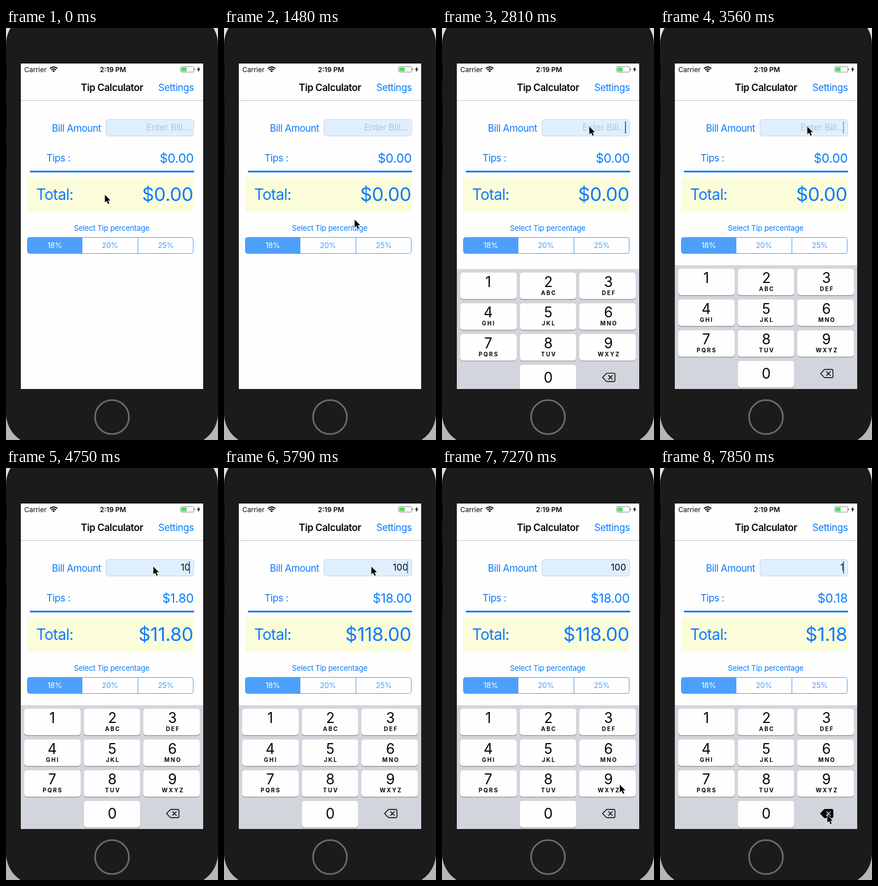
An HTML page for the animation above (8 s loop, 372x719 px).

```html
<!DOCTYPE html>
<html lang="en">
<head>
<meta charset="utf-8">
<title>Tip Calculator</title>
<style>
  html, body { margin: 0; width: 100%; height: 100%; overflow: hidden; }
  body { background: linear-gradient(#dcdcde, #b8b5b8); }
  svg { display: block; width: 372px; height: 719px; }
  text {
    font-family: Inter, Roboto, sans-serif; font-size: 17px; letter-spacing: -.023em;
    font-optical-sizing: none; fill: #087bff; white-space: pre;
  }
  .mid { text-anchor: middle; }
  .end { text-anchor: end; }
  .bold { font-weight: 600; }
  .ink { fill: #080808; }
  .status { font-size: 12px; letter-spacing: 0; }
  .small { font-size: 13px; letter-spacing: -.01em; }
  .input { font-size: 16px; letter-spacing: -.015em; fill: #b7c4d2; }
  .input.typed { letter-spacing: 0; fill: #080808; }
  .tip { font-size: 22px; letter-spacing: -.01em; }
  .total { font-size: 33px; letter-spacing: -.01em; }
  .heading { font-size: 26.5px; }
  .digit { font-size: 25px; letter-spacing: 0; }
  .letters { font-size: 10px; letter-spacing: 2px; font-weight: 700; }
  .pale { fill: #4ca0fb; }
  .white { fill: #fff; }
</style>
</head>
<body>
<svg viewBox="0 0 372 719">
  <defs>
    <clipPath id="screen"><rect x="26" y="62" width="320" height="568"/></clipPath>
  </defs>

  <!-- phone -->
  <rect y="-27" width="372" height="755" rx="56" fill="#1b1b1b"/>
  <path d="M.5 62v30M.5 124v58M.5 194v58" stroke="#050505"/>
  <circle cx="186" cy="679" r="29.7" fill="none" stroke="#6c6c6c" stroke-width="2.8"/>
  <rect x="26" y="62" width="320" height="568" fill="#fefefe"/>

  <!-- status bar -->
  <text class="status ink" x="32" y="76.5">Carrier</text>
  <g fill="none" stroke="#080808" stroke-width="2">
    <path d="M77.2 70.7a9 9 0 0 1 12.8 0M79.5 73.2a5.8 5.8 0 0 1 8.2 0"/>
    <path d="M83.6 77.2l-2.2-2.3a3 3 0 0 1 4.4 0z" fill="#080808" stroke="none"/>
  </g>
  <text class="status ink bold mid" x="187.7" y="76.5">2:19 PM</text>
  <rect x="306.5" y="67.5" width="23" height="9.5" rx="2" fill="none" stroke="#8b8b8b"/>
  <rect x="308" y="69" width="9" height="6.5" fill="#57d664"/>
  <path d="M331 70.5v3.5" stroke="#8b8b8b" stroke-width="1.4"/>
  <path d="M339.2 67.5l-4.2 5.3h2.6l-1 4.2 4.4-5.4h-2.6z" fill="#080808"/>

  <!-- navigation bar -->
  <text class="ink bold mid" x="186" y="110">Tip Calculator</text>
  <text class="end" x="329.5" y="110">Settings</text>
  <path d="M26 126.5h320" stroke="#c8c8c8"/>

  <!-- form -->
  <text class="end" x="167" y="181">Bill Amount</text>
  <rect x="175.5" y="159.5" width="154" height="29" rx="4.5" fill="#dfeffe" stroke="#c6d8e8"/>
  <text class="input end" x="323" y="179" id="bill"></text>
  <rect x="321" y="163" width="2" height="21" fill="#3f6ce8" id="caret"/>
  <text x="71" y="233">Tips :</text>
  <text class="tip end" x="329.5" y="235" id="tip"></text>
  <rect x="42" y="249" width="288" height="3" fill="#087bff"/>
  <rect x="37" y="260" width="292" height="61" fill="#fbfcda"/>
  <text class="heading" x="53" y="300">Total:</text>
  <text class="total end" x="328.5" y="302" id="total"></text>

  <!-- percentage choice -->
  <text class="small mid" x="185.5" y="354">Select Tip percentage</text>
  <path d="M134 365.5H41.5a4 4 0 0 0-4 4v20a4 4 0 0 0 4 4H134z" fill="#4ca0fb"/>
  <rect x="37.5" y="365.5" width="291" height="28" rx="4" fill="none" stroke="#4ca0fb"/>
  <path d="M231.5 365.5v28" stroke="#4ca0fb"/>
  <text class="small mid white" x="85.5" y="384">18%</text>
  <text class="small mid pale" x="182.5" y="384">20%</text>
  <text class="small mid pale" x="280.5" y="384">25%</text>

  <g clip-path="url(#screen)">
    <g id="keyboard">
      <rect x="26" width="320" height="217" fill="#d2d5dc"/>
      <g id="keys"></g>
      <path id="eraser" d="M281.8 189l6.2-6.500q.9-.8 2-.8h11.2q2.300 0 2.300 2.300v10q0 2.300-2.300 2.300H290q-1.100 0-2-.8z"
        stroke="#080808" stroke-width="1.4" stroke-linejoin="round"/>
      <path id="cross" d="M292.300 185.700l6.600 6.600m0-6.600l-6.600 6.600" fill="none" stroke-width="1.5" stroke-linecap="round"/>
    </g>
  </g>

  <path id="pointer" d="M0 0V13.600L3.200 10.700L5.500 16L7.900 15L5.600 9.900H9.900Z"
    fill="#050505" stroke="#fff" stroke-width="1.500" stroke-linejoin="round" paint-order="stroke"/>
</svg>

<script>
const LOOP = 8000;
const TICK = 147.6;
const FOCUS = 2472;            // the bill field gets the focus
const TYPE = 4300, TYPE_GAP = 450;
const ERASE = 7710, ERASE_GAP = 140;

const moves = [
  { start: 600, end: 880, x: 210, y: 441, bow: 0 },
  { start: 1035, end: 2060, x: 258.5, y: 172, bow: 0 },
  { start: 5905, end: 6340, x: 288.5, y: 180.5, bow: 0 },
  { start: 6640, end: 7400, x: 293.5, y: 605.5, bow: 50 }
];

const $ = id => document.getElementById(id);
const clamp = (value, low, high) => Math.min(high, Math.max(low, value));
const ease = p => p * p * (3 - 2 * p);
const countSince = (time, start, gap, max) => clamp(Math.floor((time - start) / gap) + 1, 0, max);

function pointerAt(time) {
  let x = 173.5, y = 291;
  for (const move of moves) {
    const p = ease(clamp((time - move.start) / (move.end - move.start), 0, 1));
    x += (move.x - x) * p + move.bow * Math.sin(Math.PI * p);
    y += (move.y - y) * p;
  }
  return [x, y];
}

// Critically damped spring from the bottom edge of the screen.
function keyboardTop(time) {
  const t = .016 * Math.max(0, time - FOCUS);
  return 414 + 216 * (1 + t) * Math.exp(-t);
}

// The caret stays solid after a key press, then fades in and out.
function caretOpacity(time, lastKey) {
  if (time < FOCUS) return 0;
  const phase = Math.max(0, time - lastKey - 300) / 1050;
  return clamp(.7 + 1.6 * Math.cos(2 * Math.PI * phase), 0, 1);
}

function buildKeys() {
  const letters = ['', 'ABC', 'DEF', 'GHI', 'JKL', 'MNO', 'PQRS', 'TUV', 'WXYZ'];
  const key = (label, sub, col, row) => {
    const x = 32 + col * 104.5, y = 6 + row * 53.7, mid = 81 + col * 105.5;
    const baseline = y + (label === '0' ? 31 : 25);
    return `<rect x="${x}" y="${y + 1}" width="99" height="46.500" rx="5" fill="#8b8e94"/>
      <rect x="${x}" y="${y}" width="99" height="46.300" rx="5" fill="#fefefe"/>
      <text class="digit ink mid" x="${mid}" y="${baseline}">${label}</text>
      <text class="letters ink mid" x="${mid + 1}" y="${y + 39}">${sub}</text>`;
  };
  $('keys').innerHTML = letters
    .map((sub, i) => key(String(i + 1), sub, i % 3, Math.floor(i / 3)))
    .join('') + key('0', '', 1, 3);
}

function draw(time) {
  const held = Math.floor(time / TICK) * TICK;
  const typed = countSince(time, TYPE, TYPE_GAP, 3);
  const erased = countSince(time, ERASE, ERASE_GAP, 2);
  const digits = typed - erased;
  const bill = digits ? 10 ** (digits - 1) : 0;
  const lastKey = erased ? ERASE + (erased - 1) * ERASE_GAP
    : typed ? TYPE + (typed - 1) * TYPE_GAP : FOCUS;
  const pressed = time >= ERASE - ERASE_GAP;

  $('pointer').setAttribute('transform', `translate(${pointerAt(held)})`);
  $('keyboard').setAttribute('transform', `translate(0 ${keyboardTop(held)})`);
  $('caret').setAttribute('opacity', caretOpacity(held, lastKey));
  $('bill').textContent = bill || 'Enter Bill...';
  $('bill').classList.toggle('typed', bill > 0);
  $('tip').textContent = '$' + (bill * .18).toFixed(2);
  $('total').textContent = '$' + (bill * 1.18).toFixed(2);
  $('eraser').setAttribute('fill', pressed ? '#080808' : 'none');
  $('cross').setAttribute('stroke', pressed ? '#d2d5dc' : '#080808');
}

buildKeys();
const start = performance.now();
function frame() {
  draw((performance.now() - start) % LOOP);
  requestAnimationFrame(frame);
}
frame();
</script>
</body>
</html>
```
